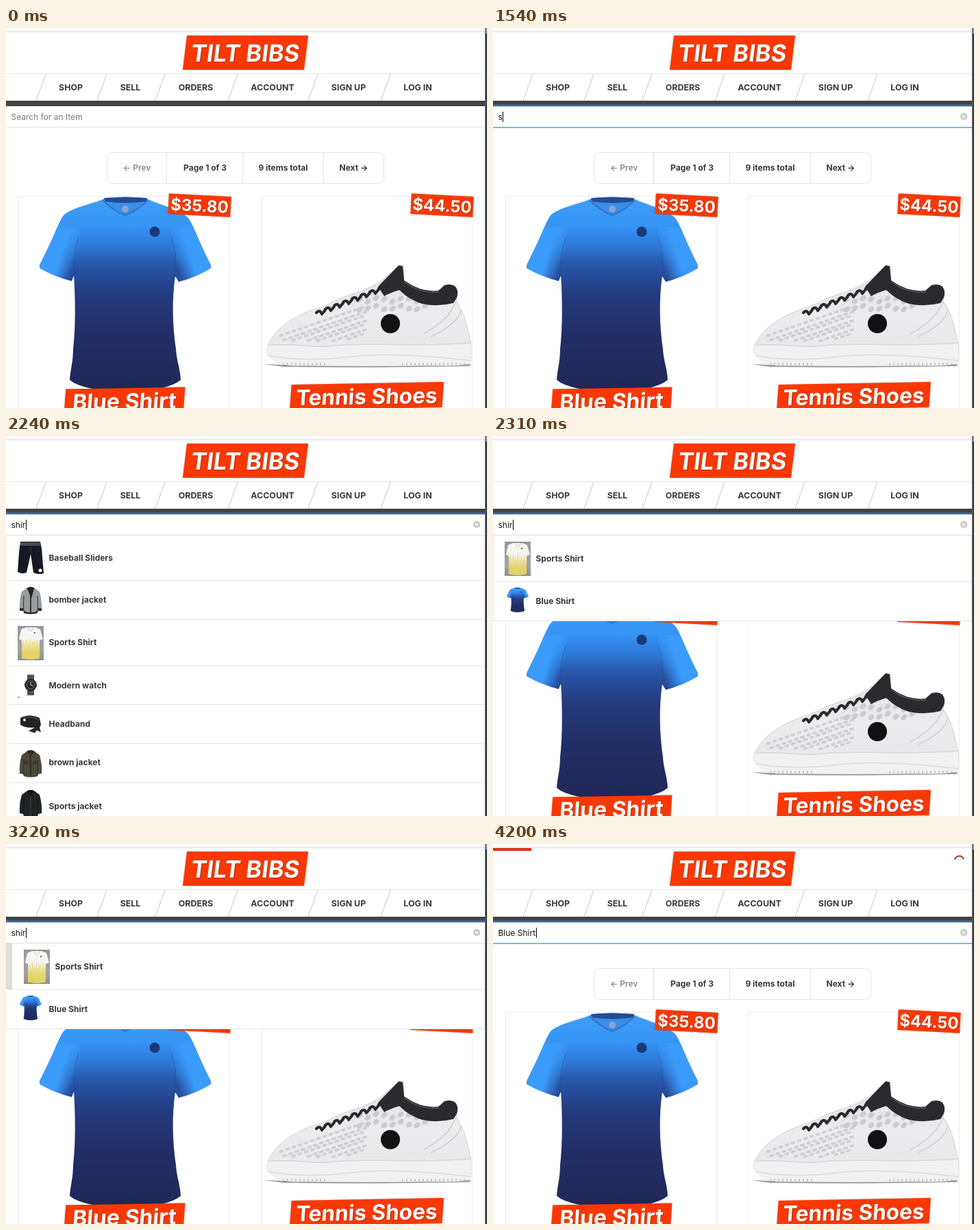
Write an HTML page with a canvas that moves like this. It is 702 px wide and 554 px high and loops after 4.27 s.

```html
<!DOCTYPE html>
<html lang="en">
<head>
<meta charset="utf-8">
<title>Shop search</title>
<style>
  html, body { margin: 0; width: 100%; height: 100%; overflow: hidden; background: #fff; }
  canvas { display: block; width: 702px; height: 554px; }
</style>
</head>
<body>
<canvas id="stage"></canvas>
<script>
const W = 702, H = 554, LOOP = 4270, STEP = 70;
const RED = '#fa3804', INK = '#393939', LINE = '#e6e6e6';
const canvas = document.getElementById('stage');
const dpr = window.devicePixelRatio || 1;
canvas.width = W * dpr;
canvas.height = H * dpr;
const ctx = canvas.getContext('2d');

// Timeline in ms
const FOCUS = 630, LIST = 1610, FILTERED = 2310, FIRST = 2834, SECOND = 3300, CHOSEN = 3780;
const typing = [[FOCUS, ''], [1190, 's'], [1680, 'sh'], [1820, 'shi'], [1960, 'shir'], [CHOSEN, 'Blue Shirt']];

// ---- helpers ----
function rect(x, y, w, h, fill) {
  ctx.fillStyle = fill;
  ctx.fillRect(x, y, w, h);
}

function path(d, fill, stroke, width = 1) {
  const p = new Path2D(d);
  if (fill) { ctx.fillStyle = fill; ctx.fill(p); }
  if (stroke) { ctx.strokeStyle = stroke; ctx.lineWidth = width; ctx.stroke(p); }
  return p;
}

function oval(x, y, rx, ry, fill, turn = 0) {
  ctx.beginPath();
  ctx.ellipse(x, y, rx, ry, turn, 0, Math.PI * 2);
  ctx.fillStyle = fill;
  ctx.fill();
}

function text(s, x, y, size, weight, fill, align = 'left') {
  ctx.font = `${weight} ${size}px Inter, Arial, sans-serif`;
  ctx.textAlign = align;
  ctx.fillStyle = fill;
  ctx.fillText(s, x, y);
}

function group(draw, x = 0, y = 0, scale = 1) {
  ctx.save();
  ctx.translate(x, y);
  ctx.scale(scale, scale);
  draw();
  ctx.restore();
}

function gradient(x0, y0, x1, y1, ...stops) {
  const g = ctx.createLinearGradient(x0, y0, x1, y1);
  stops.forEach(([at, color]) => g.addColorStop(at, color));
  return g;
}

const rad = deg => deg * Math.PI / 180;
const clamp = v => Math.min(1, Math.max(0, v));
const bez = (a, b, u) => 3 * a * u * (1 - u) ** 2 + 3 * b * u * u * (1 - u) + u ** 3;

// CSS "ease"
function ease(x) {
  x = clamp(x);
  let lo = 0, hi = 1;
  for (let i = 0; i < 20; i++) {
    const mid = (lo + hi) / 2;
    if (bez(.25, .25, mid) < x) lo = mid; else hi = mid;
  }
  return bez(.1, 1, lo);
}

const ramp = (t, start) => ease((t - start) / 200);

// Slanted red label with white text
function label(s, x, y, w, h, size, skew, turn) {
  ctx.save();
  ctx.translate(x, y);
  ctx.transform(1, 0, Math.tan(rad(skew)), 1, 0, 0);
  ctx.rotate(rad(turn));
  ctx.shadowColor = 'rgba(0,0,0,.3)';
  ctx.shadowBlur = 2 * dpr;
  rect(-w / 2, -h / 2, w, h, RED);
  ctx.shadowColor = 'rgba(90,20,0,.4)';
  ctx.shadowBlur = 1.5 * dpr;
  ctx.shadowOffsetX = ctx.shadowOffsetY = dpr;
  text(s, 0, size * .38, size, 700, '#fff', 'center');
  ctx.restore();
}

// ---- products ----
const SHIRT = 'M143 249 C128 256 101 260 85 272 C78 279 74 297 49 346 L49 350 Q72 363 96 369 L99 361 ' +
  'C101 390 102 435 98 468 C98 486 94 498 93 513 Q110 528 174 531 Q238 528 255 513 ' +
  'C254 495 249 486 248 468 C243 435 242 395 247 362 L252 370 Q276 364 299 350 L299 346 ' +
  'C277 302 273 285 265 276 C252 263 226 259 206 249 Z';

function shirt() {
  const body = path(SHIRT, gradient(0, 248, 0, 528,
    [0, '#409ef8'], [.15, '#3593f4'], [.25, '#2d78d6'], [.35, '#2856a8'],
    [.49, '#243c80'], [.69, '#222f68'], [1, '#1f2857']));
  ctx.save();
  ctx.clip(body);
  const blue = '#3b9bfa', clear = 'rgba(59,155,250,0)';
  rect(45, 290, 63, 85, gradient(82, 325, 104, 332, [0, blue], [1, clear]));
  rect(240, 290, 63, 85, gradient(268, 325, 244, 332, [0, blue], [1, clear]));
  ctx.restore();
  path('M99 361 Q97 332 106 306 M247 362 Q250 332 242 306', null, 'rgba(25,75,155,.35)', 1.5);
  path('M143 248 Q174 245 206 248 L203 254 Q190 265 174 273 Q157 266 144 254 Z', '#3a8ee4');
  path('M143 248 Q174 245 206 248 L204 253 Q174 257 145 253 Z', '#214d94');
  path('M141 251 Q154 265 174 273 Q194 265 207 251', null, '#2c77cd', 2);
  oval(174, 264, 5, 5, '#8da6c9');
  oval(217, 297, 7.5, 7.5, '#183a78');
}

function shoe() {
  path('M376 490 Q520 496 679 490 L676 493 Q530 496 405 494 Z', '#9d9da0');
  const upper = path('M381 466 C386 450 402 433 423 422 C443 410 462 409 481 397 C505 387 530 381 549 368 ' +
    'L573 347 L580 348 L581 368 Q606 386 631 383 L642 375 Q656 374 658 384 L657 398 ' +
    'C669 414 674 438 679 461 L679 486 Q672 492 645 492 L416 492 Q386 488 380 472 Z',
    gradient(0, 370, 0, 492, [0, '#e4e4e8'], [.4, '#ececef'], [.7, '#e9e9ec'], [1, '#f2f2f3']),
    '#d2d2d7');
  ctx.save();
  ctx.clip(upper);
  // mesh on toe and side
  for (let row = 0; row < 7; row++) {
    for (let col = 0; col < 14; col++) {
      const x = 402 + col * 9 + (row % 2) * 4.5, y = 448 - col * 3.1 + row * 6.5;
      if (y < 456) oval(x, y, 3.6, 2, '#cfcfd5', -.3);
    }
  }
  for (let i = 0; i < 9; i++) {
    for (let j = 0; j < 2; j++) {
      oval(516 + i * 12, 396 + j * 12 + Math.sin(i * 2 + j) * 3, 5, 3.6, '#cbccd2', -.7);
    }
  }
  path('M610 445 Q646 427 657 398 M620 450 Q660 432 665 409', null, '#cdced3', 1.4);
  path('M380 463 C420 458 450 468 482 463 C530 457 580 466 679 459 L679 494 L380 494 Z', '#f1f1f2');
  path('M380 463 C420 458 450 468 482 463 C530 457 580 466 679 459', null, '#d6d7db', 1.5);
  path('M381 477 Q430 487 496 480 Q560 471 679 485', null, '#dcdce0', 1.6);
  for (let x = 392; x < 674; x += 6) {
    if (x < 470 || x > 575) rect(x, 488, 2, 4, '#cacace');
  }
  ctx.restore();
  path('M543 377 L573 346 L579 347 L581 368 Q606 386 631 383 L640 375 Q650 372 656 377 ' +
    'Q661 384 658 393 L653 401 Q630 407 607 402 Q588 396 574 382 Q560 386 552 391 Z', '#2b2b2f');
  path('M581 370 Q606 388 632 385', null, '#57575b', 1.3);
  // laces
  ctx.lineCap = ctx.lineJoin = 'round';
  for (let i = 0; i < 8; i++) {
    const x = 453 + i * 13, y = 415 - i * 5;
    path(`M${x} ${y} Q${x + 5} ${y - 5} ${x + 8} ${y + 2} L${x + 13} ${y - 4}`, null, '#2a2a2d', 4.2);
  }
  oval(561, 431, 14, 14, '#111113');
}

// ---- thumbnails, drawn in a 38px wide box ----
function jacket(color, trim, front) {
  path('M13 2 Q19 -2 25 2 L32 7 Q36 22 35 34 L30 35 L29 38 Q19 41 9 38 L8 35 L3 34 Q2 20 6 7 Z', color);
  path('M13 2 L19 9 L25 2 Q19 -2 13 2 Z', trim);
  path('M9 13 Q8 26 9 36 M29 13 Q30 26 29 36', null, trim, 1);
  path('M19 8 L19 38', null, front, 1.6);
}

const thumbs = {
  shorts() {
    path('M4 0 L33 0 L35 10 L38 46 Q30 49 23 45 L19 18 L13 45 Q6 48 0 44 L2 16 Z', '#171923');
    rect(4, 1, 29, 5, '#4b4d56');
    path('M19 8 L19 20', null, '#343744', 1);
    oval(33, 42, 2.5, 2.5, '#fff');
  },
  bomber() {
    jacket('#9a9b9e', '#26272a', '#1d1d20');
    path('M14 2 L24 2 L20 17 Z', '#222226');
    path('M9 35 Q19 40 29 35 L29 38 Q19 41 9 38 Z', '#222');
    rect(3, 31, 5, 4, '#29292b');
    rect(30, 31, 5, 4, '#29292b');
  },
  sports() {
    rect(0, 0, 38, 50, gradient(0, 0, 0, 50, [0, '#979799'], [.7, '#a3a3a4'], [1, '#8e8e8f']));
    const p = path('M12 2 L26 2 L33 5 L37 19 L32 21 L32 47 Q19 50 6 47 L6 21 L2 19 L5 5 Z', '#f4f4f1');
    ctx.save();
    ctx.clip(p);
    rect(4, 20, 30, 30, gradient(0, 20, 0, 38, [0, 'rgba(228,211,102,0)'], [1, '#e4d366']));
    for (let i = 0; i < 13; i++) {
      const h = 7 + 5 * Math.sin(i * 2.4);
      rect(6 + i * 2, 31 - h, 1, h + 3, '#e8d878');
    }
    ctx.restore();
    path('M14 2 L19 8 L24 2', null, '#c9c9c6', 1);
    oval(25, 10, 1, 1, '#333');
  },
  watch() {
    rect(14, 0, 10, 30, '#3d3e41');
    for (let y = 1; y < 30; y += 3) rect(14, y, 10, .8, '#898a8d');
    oval(19, 15, 9, 9, '#2a2b2e');
    oval(19, 15, 6.5, 6.5, '#4a4b50');
    oval(19, 15, 4.5, 4.5, '#222326');
    path('M19 11 L19 15 L22 16', null, '#ddd', 1);
    rect(0, 32, 3, 2, '#aaa');
  },
  headband() {
    path('M4 4 Q17 -3 32 4 L34 14 L32 18 L34 25 L28 22 L25 26 L16 23 L25 18 Q10 19 4 14 Z', '#202326');
    path('M7 5 Q20 0 31 7', null, '#46494d', 1.5);
    oval(10, 7, 2, 2, '#ddd');
  },
  brown() {
    jacket('#4c483b', '#302e27', '#2b2923');
    rect(9, 15, 7, 6, '#3d3a30');
    rect(22, 15, 7, 6, '#3d3a30');
  },
  black() {
    jacket('#202226', '#15171a', '#303238');
  },
  blue() {
    group(shirt, -3, -32, .126);
  }
};

const ALL = [
  ['Baseball Sliders', 'shorts', 154, 182, 210],
  ['bomber jacket', 'bomber', 220, 243, 267],
  ['Sports Shirt', 'sports', 277, 305, 335],
  ['Modern watch', 'watch', 348, 368, 391],
  ['Headband', 'headband', 407, 424, 448],
  ['brown jacket', 'brown', 458, 480, 505],
  ['Sports jacket', 'black', 516, 544, 575]
];
const FOUND = [
  ['Sports Shirt', 'sports', 154, 183, 212],
  ['Blue Shirt', 'blue', 222, 245, 269]
];

// ---- page parts ----
function header() {
  rect(0, 5, 699, 1, '#d4dee5');
  label('TILT BIBS', 349.5, 36, 177, 50, 34.5, -7, 0);
  rect(0, 66, 699, 1, LINE);
  [['SHOP', 94.5], ['SELL', 181.5], ['ORDERS', 277], ['ACCOUNT', 389], ['SIGN UP', 500], ['LOG IN', 601]]
    .forEach(([s, x]) => text(s, x, 91, 12.4, 700, INK, 'center'));
  [58, 147, 232, 338, 455, 561]
    .forEach(x => path(`M${x} 67 L${x - 14} 106`, null, '#d9d9d9', 1.4));
  rect(0, 106, 699, 8, '#434344');
}

function pager() {
  ctx.beginPath();
  ctx.roundRect(147.5, 181.5, 404, 45, 8);
  ctx.strokeStyle = LINE;
  ctx.lineWidth = 1;
  ctx.stroke();
  [234, 345, 463].forEach(x => rect(x, 182, 1, 44, LINE));
  text('← Prev', 191, 208, 12, 600, '#8b8b8b', 'center');
  text('Page 1 of 3', 290.5, 208, 12, 700, INK, 'center');
  text('9 items total', 404.5, 208, 12, 700, INK, 'center');
  text('Next →', 507.5, 208, 12, 700, INK, 'center');
}

function cards() {
  ctx.strokeStyle = '#ededed';
  ctx.lineWidth = 1;
  ctx.strokeRect(18.5, 245.5, 308, 330);
  ctx.strokeRect(372.5, 245.5, 308, 330);
  shirt();
  group(shoe);
  label('$35.80', 282.5, 258.5, 91, 30, 24, 0, 3);
  label('$44.50', 636.5, 258.5, 91, 30, 24, 0, 3);
  label('Blue Shirt', 173, 543.5, 174, 37, 32, -5, -1);
  label('Tennis Shoes', 526.5, 536.5, 222, 37, 31.5, -5, -1);
}

function search(t) {
  rect(0, 144, 699, 1, LINE);
  const last = typing.filter(([at]) => at <= t).pop();
  const value = last ? last[1] : '';
  if (!value) text('Search for an Item', 7.5, 134, 12, 400, '#7a7a7a');
  if (!last) return;
  rect(0, 111, 699, 1, '#4a5777');
  rect(0, 112, 699, 2, '#41639f');
  rect(0, 114, 699, 1, '#c2d3e9');
  rect(0, 144, 699, 2, '#8db3da');
  text(value, 7.5, 134, 12, 400, '#111');
  if ((t - last[0]) % 1000 < 500) {
    rect(8 + Math.round(ctx.measureText(value).width), 122, 1, 15, '#000');
  }
  if (value) {
    oval(687, 129, 5, 5, '#c6c6c6');
    path('M685 127 L689 131 M689 127 L685 131', null, '#fff', 1.2);
  }
}

function dropdown(rows, glow) {
  const end = rows[rows.length - 1][4];
  rect(0, 144, 699, end - 143, '#fff');
  rect(0, 144, 699, 1, '#dadada');
  rect(0, 144, 1, end - 143, '#eee');
  rect(698, 144, 1, end - 143, '#eee');
  let top = 145;
  rows.forEach(([name, thumb, y, base, bottom], i) => {
    const k = glow[i] || 0;
    rect(5, bottom, 694, 1, LINE);
    if (k > 0) rect(0, top, 9, bottom - top, `rgba(222,220,221,${k * k})`);
    group(thumbs[thumb], 17 + 9 * k, y);
    text(name, 62.5 + 9 * k, base, 12, 700, INK);
    top = bottom + 1;
  });
  rect(0, end, 699, 1, LINE);
}

function progress(t) {
  rect(0, 6, 56 * ramp(t, CHOSEN), 4, '#e42f0f');
  const turn = rad((t - 3750) / 400 * 360);
  ctx.beginPath();
  ctx.arc(680.5, 24, 6.6, turn + rad(145), turn + rad(300));
  ctx.strokeStyle = '#b83326';
  ctx.lineWidth = 2;
  ctx.lineCap = 'butt';
  ctx.stroke();
}

function edge() {
  rect(699, 0, 3, H, '#3c3e44');
  rect(699, 0, 3, 8, '#8a93a3');
  rect(699, 0, 1, H, '#5b5c61');
}

function render(t) {
  ctx.setTransform(dpr, 0, 0, dpr, 0, 0);
  rect(0, 0, W, H, '#fff');
  header();
  pager();
  cards();
  search(t);
  if (t >= LIST && t < FILTERED) dropdown(ALL, []);
  if (t >= FILTERED && t < CHOSEN) {
    const second = ramp(t, SECOND);
    dropdown(FOUND, [ramp(t, FIRST) - second, second]);
  }
  if (t >= CHOSEN) progress(t);
  edge();
}

const start = performance.now();
function tick() {
  const t = (performance.now() - start) % LOOP;
  render(Math.floor(t / STEP) * STEP);
  requestAnimationFrame(tick);
}
tick();
</script>
</body>
</html>
```
